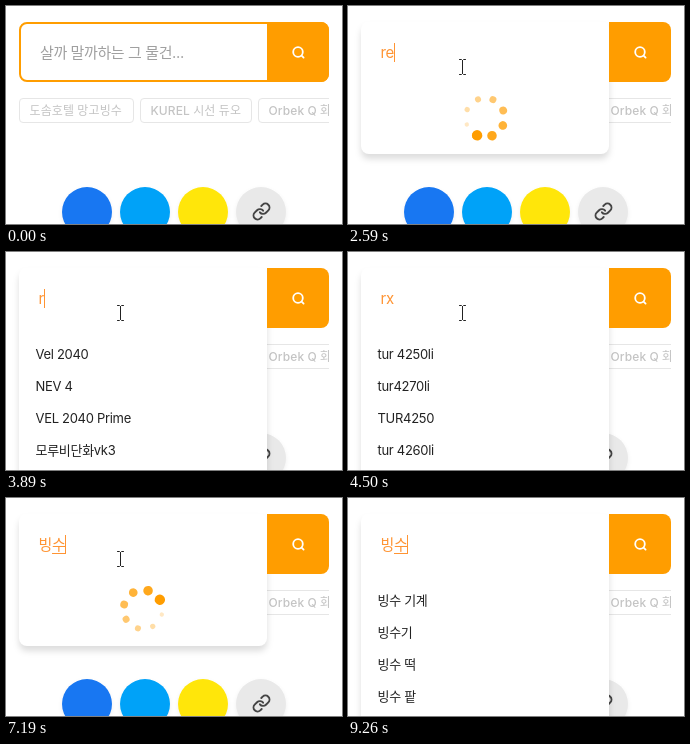
An HTML page that plays this animation: 336x218 px, repeating every 9680 ms.

```html
<!DOCTYPE html>
<html lang="ko">
<head>
<meta charset="utf-8">
<style>
html, body { margin: 0; width: 100%; height: 100%; overflow: hidden; background: #fff; }
svg { display: block; }
text { font: 13px Inter, "Noto Sans CJK KR", sans-serif; letter-spacing: -.3px; fill: #222; white-space: pre; }
.input { font-size: 15px; letter-spacing: -.4px; fill: #ff9433; }
.input.hint { fill: #a0a0a0; }
.chip text { font-size: 12px; font-weight: 500; letter-spacing: .1px; fill: #c4c4c4; }
.chip rect { fill: #fff; stroke: #e6e6e6; }
.shadow { filter: drop-shadow(0 2px 2px #0001); }
#panel { filter: drop-shadow(0 5px 3px #0002); }
.line { fill: none; stroke-linecap: round; stroke-linejoin: round; }
</style>
</head>
<body>
<svg width="336" height="218" viewBox="0 0 336 218">
  <clipPath id="row"><rect x="12" y="90" width="311" height="30"/></clipPath>
  <g id="chips" clip-path="url(#row)"></g>
  <g id="share"></g>
  <g class="line" transform="translate(255.5 205.5) scale(.8) translate(-12 -12)" stroke="#444" stroke-width="2.4">
    <path d="M10 13a5 5 0 0 0 7.54.54l3-3a5 5 0 0 0-7.07-7.07l-1.72 1.71"/>
    <path d="M14 11a5 5 0 0 0-7.54-.54l-3 3a5 5 0 0 0 7.07 7.07l1.71-1.71"/>
  </g>
  <rect id="border" x="14" y="17" width="308" height="58" rx="7" fill="#fff" stroke="#ff9d00" stroke-width="2"/>
  <rect id="panel" x="13" y="16" width="248" rx="8" fill="#fff"/>
  <path d="M261 16h54a8 8 0 0 1 8 8v44a8 8 0 0 1-8 8h-54z" fill="#ff9d00"/>
  <g class="line" stroke="#fff" stroke-width="1.8">
    <circle cx="292" cy="46" r="4.8"/><path d="M295.6 49.6l2 2"/>
  </g>
  <text id="input" class="input" y="52"></text>
  <path id="mark" stroke="#ff9433"/>
  <path id="caret" stroke="#ff9433"/>
  <g id="items"></g>
  <g id="spinner" fill="#ff9d00"></g>
  <path id="pointer" class="line" stroke="#222" d="M111.5 53.5h2l1 1 1-1h2M114.5 54.5v13M111.5 68.5h2l1-1 1 1h2"/>
</svg>
<script>
const LOOP = 9680, HINT = '살까 말까하는 그 물건...';
const $ = id => document.getElementById(id);
const show = (el, on) => el.style.display = on ? '' : 'none';

const lists = [
  ['Vel 2040', 'NEV 4', 'VEL 2040 Prime', '모루비단화vk3'],
  ['silev', 'cardinal red', 'restorate', 'Close to rain'],
  ['tur 4250li', 'tur4270li', 'TUR4250', 'tur 4260li'],
  ['빙수 기계', '빙수기', '빙수 떡', '빙수 팥']
];

// [start, typed text, view (a number picks a list), caret]
const steps = [
  [0, '', 'idle', 0],
  [710, '', 'open', 1], [1240, '', 'open', 0],
  [1770, 'r', 0, 1], [2190, 're', 'wait', 1],
  [2990, 're', 1, 1], [3090, 'rex', 1, 1], [3190, 'rex', 'wait', 1],
  [3890, 'r', 0, 1], [4100, 'rx', 'wait', 1],
  [4500, 'rx', 2, 0], [4710, 'rx', 2, 1], [5440, 'rx', 2, 0], [5540, 'r', 2, 1],
  [5750, '', 'open', 0], [5960, '', 'open', 1], [6380, '', 'open', 0],
  [6690, 'ㅂ', 'wait', 1], [6790, '비', 'wait', 1], [6990, '빙', 'wait', 1],
  [7090, '빙ㅅ', 'wait', 1], [7190, '빙수', 'wait', 1],
  [7890, '빙수', 3, 1], [8100, '빙수', 3, 0], [8630, '빙수', 3, 1]
];
const heights = { idle: 0, open: 60, wait: 132 };

$('chips').innerHTML = [
  [13, 115, '도솜호텔 망고빙수'], [134, 112, 'KUREL 시선 듀오'], [252, 120, 'Orbek Q 화']
].map(([x, w, label]) => `<g class="chip">
  <rect x="${x + .5}" y="92.5" width="${w - 1}" height="24" rx="3.5"/>
  <text x="${x + 10.5}" y="109">${label}</text></g>`).join('');

$('share').innerHTML = ['#1877f2', '#00a2f8', '#ffe60a', '#e9e9e9'].map((color, i) =>
  `<circle class="shadow" cx="${81 + 58 * i}" cy="206" r="25" fill="${color}"/>`).join('');

$('spinner').innerHTML = Array.from({ length: 8 }, (_, i) =>
  `<circle cx="19.5" r="${5.2 - .43 * i}" opacity="${1 - .11 * i}" transform="rotate(${-45 * i})"/>`).join('');

let last;
function apply(step) {
  const [, typed, view, caret] = step;
  const input = $('input'), idle = view === 'idle';
  input.textContent = typed || HINT;
  input.classList.toggle('hint', !typed);
  input.setAttribute('x', idle ? 34 : 32.5);

  const end = typed ? Math.ceil(32 + input.getComputedTextLength()) + .5 : 33.5;
  show($('caret'), caret);
  $('caret').setAttribute('d', `M${end} 37v19`);
  show($('mark'), /[ㄱ-힣]/.test(typed));
  $('mark').setAttribute('d', `M${end - 13.5} 55.5h13`);

  show($('border'), idle);
  show($('panel'), !idle);
  $('panel').setAttribute('height', heights[view] ?? 240);
  show($('spinner'), view === 'wait');
  $('items').innerHTML = (lists[view] || []).map((label, i) =>
    `<text x="29.5" y="${107 + 32 * i}">${label}</text>`).join('');
}

function draw(now) {
  const t = now % LOOP;
  const step = steps.findLast(s => s[0] <= t);
  if (step !== last) apply(last = step);
  const turn = Math.floor((t - 7190) / 100) * 36 - 30;
  $('spinner').setAttribute('transform', `translate(137 111.5) rotate(${turn})`);
  show($('pointer'), t >= 610 && t < 9160);
  requestAnimationFrame(draw);
}
draw(0);
</script>
</body>
</html>
```
